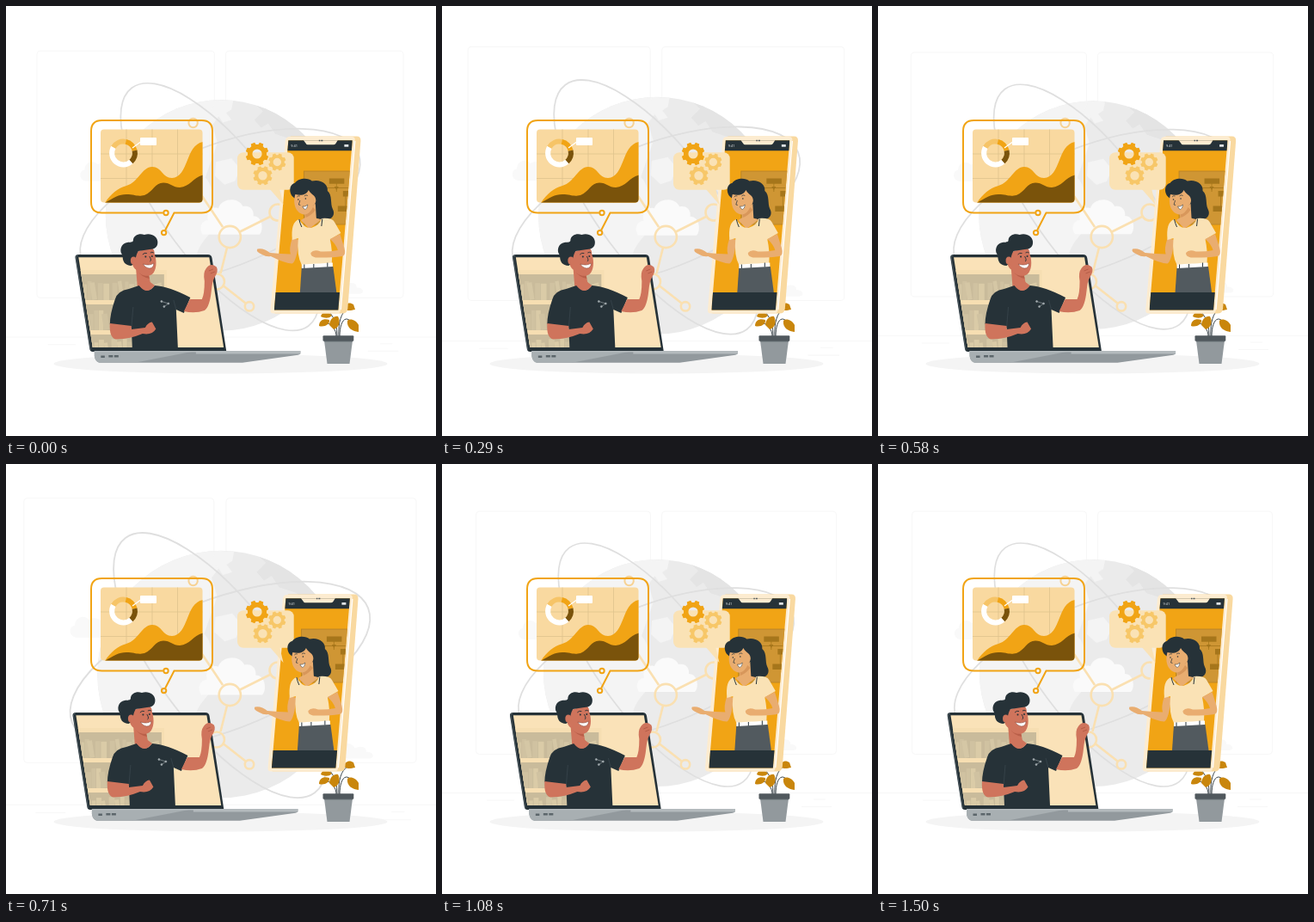
These frames come from a looping animation (500x500 px, 1540 ms). An HTML page:

```html
<!DOCTYPE html>
<html lang="en">
<head>
<meta charset="utf-8">
<title>Video call</title>
<style>
html, body { margin: 0; width: 100%; height: 100%; overflow: hidden; background: #fff; }
svg { display: block; width: 100vw; height: 100vh; }
text { font: 4px Roboto, sans-serif; }
</style>
</head>
<body>
<svg viewBox="0 0 500 500" xmlns="http://www.w3.org/2000/svg">
<defs>
  <clipPath id="globe"><circle cx="250" cy="243" r="132"/></clipPath>
  <clipPath id="lid"><path d="M84.500 292.300H236.500L253.300 397H101Z"/></clipPath>
  <clipPath id="screen"><path d="M328.500 156.300H403L386.500 353.500H312Z"/></clipPath>
  <clipPath id="card"><rect x="110" y="143.500" width="118.500" height="85" rx="4"/></clipPath>
</defs>

<g id="back">
  <g fill="none" stroke="#f7f7f7">
    <rect x="39.500" y="55" width="203" height="282.500" rx="4"/>
    <rect x="255.500" y="55" width="203" height="282.500" rx="4"/>
    <path d="M0 382.500H500M418 398.500H453M52 391H84M432 390H446"/>
  </g>
  <g fill="#f9f9f9">
    <path d="M96 204C87 203 87 192 94 191C94 182 104 179 109 185C116 180 126 186 126 194C134 196 134 204 127 204Z"/>
    <path d="M366 333C364 324 372 321 376 322C378 315 390 315 393 322C401 318 406 322 405 326C413 325 415 333 408 333Z"/>
  </g>
  <circle cx="250" cy="243" r="132" fill="#ebebeb"/>
  <g clip-path="url(#globe)" fill="#f4f4f4">
    <path d="M110 100H244L252 124L240 140L246 160L232 200C246 215 234 226 246 240C248 262 226 268 222 290L110 300Z"/>
    <path d="M245 111L264 112L262 122L256 126L262 134L252 137L246 128L238 126Z"/>
    <path d="M290 117L298 124L288 134L296 143L304 138L312 150L330 156L372 190L390 160L340 100Z" fill="#e4e4e4"/>
    <path d="M244 182L262 178L272 190L266 204L254 208L243 198Z"/>
  </g>
  <path d="M229 265C224 257 228 249 235 249C232 236 243 233 247 235C251 223 270 222 275 233C284 231 288 238 287 244C298 244 299 261 294 265Z" fill="#fafafa"/>
  <g fill="none" stroke="#dfdfdf" stroke-width="1.700">
    <ellipse rx="169.500" ry="65" transform="translate(249 233.500) rotate(53.400)"/>
    <ellipse rx="169.500" ry="70" transform="translate(249 233.500) rotate(-21.100)"/>
  </g>
</g>

<ellipse cx="249.500" cy="416" rx="194" ry="11.500" fill="#f4f4f4"/>

<g fill="none" stroke="#fae0b1" stroke-width="2.600">
  <path d="M228 221L252 257M272 262.500L308 244.500M257 281L249.500 311M253 325.500L278.500 345.500"/>
  <circle cx="260.300" cy="268.500" r="12.600"/>
  <circle cx="316" cy="240" r="9.500"/>
  <circle cx="245" cy="320.500" r="9"/>
  <circle cx="283" cy="349.300" r="5.200"/>
  <circle cx="217.600" cy="136" r="5.200" stroke="#f7d293" stroke-width="2"/>
</g>

<g>
  <path d="M385 384C385 374 383 364 376 356M387 384C386 368 390 356 397 352M388 384C388 368 394 358 402 368M384 384C384 376 378 370 374 369" fill="none" stroke="#263238" stroke-width=".9"/>
  <g fill="#c9860c">
    <path d="M393 352C394 345 400 344 404 347L406 353C401 354 397 355 393 352Z"/>
    <path d="M397 366C400 363 407 365 410 371L410 379C402 378 396 374 397 366Z"/>
    <path d="M364 372C364 365 370 363 376 365C377 370 370 374 364 372Z"/>
    <path d="M376 371C376 364 382 360 386 361C389 366 388 374 381 376Z"/>
    <path d="M366 361C367 356 374 354 379 360C375 364 370 363 366 361Z"/>
  </g>
  <path d="M370 389H403L399.500 416H373.500Z" fill="#92999d"/>
  <path d="M370 389H403L402.500 391H370.500Z" fill="#7f878b"/>
  <rect x="368.500" y="383.300" width="35.800" height="6.500" rx="1" fill="#50585d"/>
</g>

<g class="device">
  <path d="M331 151.500H408Q413 151.500 412.600 157L397.500 352Q397 357.500 391 357.500H313Z" fill="#f9d9a0"/>
  <path d="M330 152H402.500Q406.500 152 406 157L389.500 353Q389 357.500 384.500 357.500H311.500Q307.200 357.500 307.700 353L325 157Q325.500 152 330 152Z" fill="#fdecd0"/>
  <path d="M406 157L389.500 353" stroke="#fff" stroke-width="1.200"/>
  <g clip-path="url(#screen)">
    <rect x="305" y="150" width="105" height="210" fill="#f1a415"/>
    <rect x="346.500" y="192" width="70" height="62" fill="#cf9634" stroke="#b58124" stroke-width=".8"/>
    <g fill="#a6761b">
      <rect x="376" y="200.500" width="17.500" height="6.200"/>
      <rect x="392" y="215" width="14" height="6.500"/>
      <rect x="386" y="232.500" width="16" height="6.500"/>
    </g>
    <path d="M384.500 206V216M373 211.500H398M395 221V233" fill="none" stroke="#a6761b" stroke-width=".8"/>
    <path d="M382 210H387L384.500 214Z" fill="#a6761b"/>
    <path d="M300 156H410V168.300H300ZM300 333H410V360H300Z" fill="#263238"/>
    <path d="M346 156H386L383.500 160Q382.500 161.300 381 161.300H351Q349.500 161.300 349 160Z" fill="#fdecd0"/>
    <text x="331.500" y="164" fill="#dfe3e5">9:41</text>
    <rect x="393.500" y="161" width="5" height="2.800" rx=".6" fill="#dfe3e5"/>
  </g>
  <path d="M364 156.500H365.500M366.500 156.500H368.500" stroke="#50585d" stroke-width="1.500"/>
</g>

<g fill="#fae2b5">
  <path d="M306 212H318L322.500 231Z"/>
  <rect x="269" y="170.300" width="65.700" height="43.500" rx="7"/>
</g>
<g id="gears" fill-rule="evenodd"></g>

<g class="device">
  <path d="M333 270Q329 282 331 288.500Q320 288 307 287Q300 281 292.500 282.500Q290 285.500 298 289Q303 292 308 291Q325 299.500 333 299.500Q338 297 341 272Z" fill="#e9ad70"/>
  <path d="M337 224C328 220 329 207 336 206C340 200 351 199 356 203.500C366 201 375 207 374 215C380 220 377 230 380 236C384 243 378 250 371 247.500C363 250 356 245 357 238L350 222Z" fill="#263238"/>
  <path d="M347 238L360 230L361 247L367 248L353 259L343 249L348 246Z" fill="#e9ad70"/>
  <path d="M336.500 219C344 221 350 219 352 214C356 221 360 219 360.500 226C360 231 358 232 357 232C356 239 352 243 346.500 242.500C338 241 333 231 336.500 219Z" fill="#e9ad70"/>
  <path d="M357 234Q354 241 348 242.500L349 246Q356 243 360 237Z" fill="#d8975b"/>
  <path d="M345 233Q348 234 351 231Q350.500 236 348 236.500Q346 236 345 233Z" fill="#fff" stroke="#263238" stroke-width=".5"/>
  <path d="M338.500 222Q340 220 342 221M347 221Q349 219 351 220.500M342 226L340.500 231L342.500 231.500" fill="none" stroke="#263238" stroke-width=".7"/>
  <g fill="#263238"><circle cx="340" cy="225" r=".8"/><circle cx="348.500" cy="224" r=".8"/></g>
  <path d="M344 303H380.500L384.500 333H342Z" fill="#525a5f"/>
  <path d="M341 248Q347 259 355 258Q365 255 367 247Q379 246 382 251L389.500 264L377 271.500Q380 285 379 299L344 301Q338 290 340 270L333 272Q331 251 341 248Z" fill="#fae2b5"/>
  <path d="M341 248Q342 253 344 257M368 247.500L367 256" fill="none" stroke="#263238" stroke-width="1"/>
  <path d="M344 300.500L380 298.500V303L344 305Z" fill="#fff"/>
  <path d="M347 300.500V305M358 300V304.500M374 298.500V303.500" stroke="#263238" stroke-width="1"/>
  <path d="M377 271L388.500 265L393.500 281Q396 290 391 291Q378 293 360 292.500Q354 291 354.500 287Q358 282.500 366 285.500Q375 286 386 284Q384 277 377 271Z" fill="#e9ad70"/>
</g>

<g clip-path="url(#card)">
  <rect x="110" y="143" width="119" height="86" fill="#f9d9a0"/>
  <path d="M140 143V229M170 143V229M199.500 143V229M110 172H229M110 200.500H229" stroke="#dcc08c" stroke-width=".7" fill="none"/>
  <path d="M115 229C122 218 130 212 140 209C154 205 158 187 170 187C181 187 182 200 193 200C213 199 208 162 229 158V229Z" fill="#f1a415"/>
  <path d="M115 229C125 223 131 219 140 219C150 219 152 222 161 220C171 216 173 205.500 183 205.500C191 205.500 194 211 202 211C214 210 217 200 229 196.500V229Z" fill="#7a530b"/>
</g>
<g id="donut" fill="none" stroke-width="6"></g>
<path d="M147 165L158 157" stroke="#fff" stroke-width="1.200"/>
<rect x="156" y="153" width="19" height="9" rx="1" fill="#fff"/>
<g fill="none" stroke="#f1a415" stroke-width="2">
  <path d="M182.800 240.500H111.500Q99 240.500 99 228V145.500Q99 133 111.500 133H227.500Q240 133 240 145.500V228Q240 240.500 227.500 240.500H195.500L185 261"/>
  <circle cx="186" cy="240.500" r="2.700"/>
  <circle cx="183.600" cy="263.600" r="2.700"/>
</g>

<g class="device">
  <path d="M84.500 289H235Q239 289 239.700 293L256.500 402H101Q98 402 97.500 399L80.700 293Q80 289 84.500 289Z" fill="#263238"/>
  <path d="M98.500 400L81.500 292Q81.500 290 84 290" fill="none" stroke="#66737a" stroke-width=".6"/>
  <g clip-path="url(#lid)">
    <rect x="80" y="290" width="180" height="110" fill="#fae2b8"/>
    <path d="M80 307H187V398H80Z" fill="#f6deb2"/>
    <path d="M80 312H184V342H80ZM80 347H184V377H80ZM80 382H184V398H80Z" fill="#c9bb9b"/>
    <g id="books"></g>
  </g>
  <path d="M103 401H342.500V404Q342 405.500 338 406L275 414.800H109Q104 414 103 407Z" fill="#92999d"/>
  <path d="M103 401H221L150 414.800H109Q104 414 103 407Z" fill="#a8afb2"/>
  <path d="M103 401H342.500V404.500H221V402.500H103Z" fill="#b4babd"/>
  <path d="M110.500 407.700H115M119.500 407.300H124.500M126 407.300H131" stroke="#5c666b" stroke-width="2.600"/>

  <path d="M151 302L166 311L169 327L163 334L153 327Z" fill="#cf745c"/>
  <path d="M155 325L143 329Q130 331 127 341Q121 358 121 370L146 374L147 397H200L198 353L207 357L214.500 339Q190 326 173 325Q165 336 155 325Z" fill="#263238"/>
  <path d="M155 325Q164 337 173 325L168 321L155 320Z" fill="#cf745c"/>
  <path d="M148 350L146 374M198 353L195 342" stroke="#3b484f" stroke-width=".7"/>
  <path d="M121 369Q120 386 128 387.500Q145 387 159 381Q170 383 174.500 375.500L170 367.500Q165 368 162 374L146 376V372Z" fill="#cf745c"/>
  <path d="M214 341L228 341Q231 335 231 320Q229 310 233 305Q238 298 245 303.500Q247.500 308 243 315Q240 320 239 331Q237 350 231 354Q220 358 207 355Z" fill="#cf745c"/>
  <path d="M236 308L241 306M238 311L243 309" stroke="#a9523e" stroke-width=".7"/>
  <path d="M153 307Q160 314 166 313L167 317Q157 315 153 307Z" fill="#b95f49"/>
  <path d="M148 290C152 283 160 285 167 281C172 281 173 285 173 289C176 297 175 308 170 312C164 316 156 313 152 307C147 304 145 296 148 290Z" fill="#cf745c"/>
  <path d="M146 302C139 302 135 297 136 290C131 285 134 276 141 275C145 274.500 147 275 148 273C148 266 156 264 161 266C169 263.500 176 268 176.500 274C177 280 173 283 167 283L154 285C151 289 151 296 149 299Z" fill="#263238"/>
  <ellipse cx="148.500" cy="296" rx="3.500" ry="4.500" fill="#cf745c"/>
  <path d="M159.500 300Q167 302.500 172 299Q172 305 166.500 305Q162 304.500 159.500 300Z" fill="#fff" stroke="#7d3425" stroke-width=".5"/>
  <path d="M159 289Q161 286.500 164 287.500M168 287Q170 285.500 172 287M167 291Q170 296 167.500 297" fill="none" stroke="#263238" stroke-width=".9"/>
  <g fill="#263238"><circle cx="162.500" cy="291.500" r="1"/><circle cx="170" cy="291" r="1"/></g>
  <g fill="#a5adb1" stroke="#a5adb1" stroke-width=".6">
    <path d="M181 343.500L189 346L184 349.500" fill="none"/>
    <circle cx="181" cy="343.500" r="1"/><circle cx="189" cy="346" r="1"/><circle cx="184" cy="349.500" r="1"/>
  </g>
</g>
</svg>
<script>
const $ = id => document.getElementById(id);
const add = (parent, tag, attrs) => {
  const el = document.createElementNS('http://www.w3.org/2000/svg', tag);
  for (const k in attrs) el.setAttribute(k, attrs[k]);
  parent.appendChild(el);
};
const polar = (x, y, r, deg) => {
  const a = deg * Math.PI / 180;
  return (x + r * Math.sin(a)).toFixed(2) + ' ' + (y - r * Math.cos(a)).toFixed(2);
};

function gear(x, y, r, hole, fill) {
  const pts = [];
  for (let i = 0; i < 8; i++) {
    for (const [da, k] of [[-15, .82], [-10, 1], [10, 1], [15, .82]]) pts.push(polar(x, y, r * k, i * 45 + 22.5 + da));
  }
  const ring = `M${x - hole} ${y}a${hole} ${hole} 0 1 0 ${2 * hole} 0a${hole} ${hole} 0 1 0 ${-2 * hole} 0Z`;
  add($('gears'), 'path', { d: `M${pts.join('L')}Z${ring}`, fill });
}
gear(292, 172, 13.5, 5.6, '#f1a415');
gear(315.3, 181.5, 10.3, 4.7, '#f7c768');
gear(298.5, 197.2, 11.3, 5.2, '#f7c768');

for (const [from, to, stroke] of [[138, 300, '#fff'], [300, 372, '#f6c467'], [12, 78, '#f1a415'], [78, 138, '#7a530b']]) {
  const d = `M${polar(136.5, 171, 13.4, from)}A13.4 13.4 0 ${+(to - from > 180)} 1 ${polar(136.5, 171, 13.4, to)}`;
  add($('donut'), 'path', { d, stroke });
}

// Rows of books with seeded widths and heights
let seed = 7;
const rnd = () => (seed = seed * 16807 % 2147483647) / 2147483647;
const tints = ['#d5c7a5', '#dacba7', '#d0c2a1'];
for (const [base, tall] of [[342, 24], [377, 24], [398, 12]]) {
  for (let x = 91; x < 182;) {
    const width = 3 + rnd() * 4, height = tall - rnd() * 6;
    const lean = rnd() > .8 ? -9 : 0;
    add($('books'), 'rect', {
      x, y: base - height, width, height, fill: tints[Math.floor(rnd() * 3)],
      transform: `rotate(${lean} ${x} ${base})`
    });
    x += width + .7 + (rnd() > .75 ? 3 : 0);
  }
}

const LOOP = 1540, STEP = 1000 / 24;
const shake = [0, -1, 2, -4, 4, -4, 4, -4, 2, -1, 0];
const beat = [0, 1, .5, 0, 0, 1, 0, 0, 0, 0, 0];
const sample = (keys, p) => {
  const i = Math.min(Math.floor(p * 10), 9);
  return keys[i] + (keys[i + 1] - keys[i]) * (p * 10 - i);
};
const devices = document.querySelectorAll('.device');

function draw(now) {
  // The picture advances 24 times a second
  const tick = Math.floor((now % LOOP + 5) / STEP);
  const p = Math.min(tick * STEP + 25, 1500) / 1500;
  const scale = 1 + .1 * sample(beat, p);
  $('back').setAttribute('transform', `translate(250 227) scale(${scale}) translate(-250 -227)`);
  for (const d of devices) d.setAttribute('transform', `translate(${sample(shake, p)} 0)`);
}

const start = performance.now();
function frame() {
  draw(performance.now() - start);
  requestAnimationFrame(frame);
}
frame();
</script>
</body>
</html>
```
